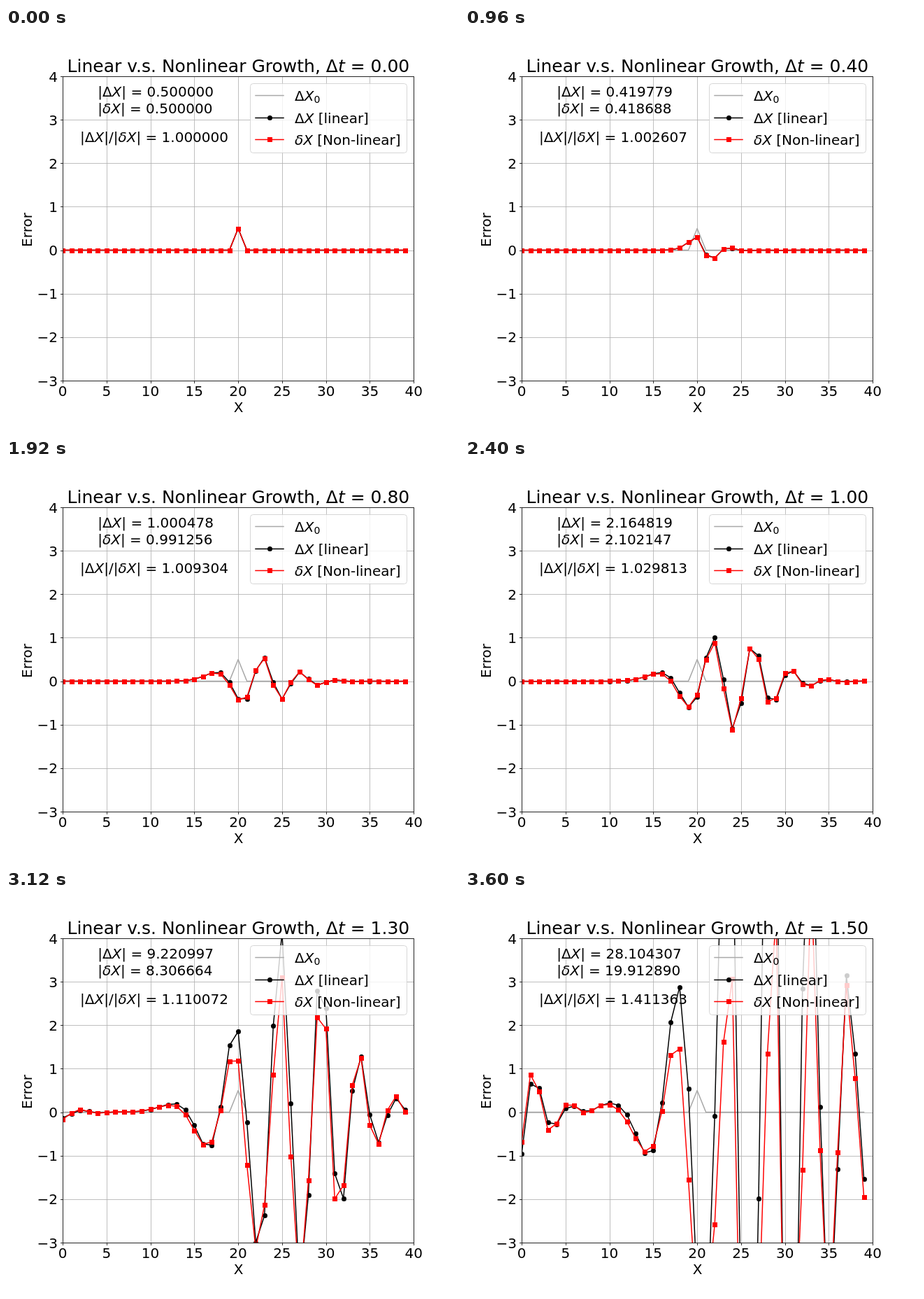
Recreate the animation shown at these times as an HTML page. Size 648 px wide and 576 px high, loop 3.72 s.

```html
<!DOCTYPE html>
<html lang="en">
<head>
<meta charset="utf-8">
<title>Linear v.s. Nonlinear Growth</title>
<style>
  html, body { margin: 0; width: 100%; height: 100%; overflow: hidden; background: #fff; }
  svg { display: block; width: 648px; height: 576px; }
  text { font: 20px "DejaVu Sans", sans-serif; white-space: pre; fill: #000; }
  .title { font-size: 25px; }
  .mid { text-anchor: middle; }
  .end { text-anchor: end; }
  .it { font-style: italic; }
  .sub { font-size: 14px; }
  .grid { stroke: #b0b0b0; stroke-opacity: .8; fill: none; }
  .axis { stroke: #000; stroke-opacity: .8; fill: none; }
  .line { stroke-width: 1.5; fill: none; stroke-linejoin: round; stroke-linecap: square; }
</style>
</head>
<body>
<svg id="stage" viewBox="0 0 648 576">
  <clipPath id="clip"><rect x="81" y="69" width="502.5" height="435.5"/></clipPath>
</svg>
<script>
const N = 40, F = 8, DT = 0.005, SUB = 10, FRAMES = 31, HOLD = 120, SITE = 20, KICK = 0.5;
const GREY = '#a9a9a9', BLACK = '#000', RED = '#f00';

// Lorenz-96: both runs start from rest, one with a kick at a single site.
const at = (v, i) => v[(i + N) % N];
const tendency = x => x.map((v, i) => at(x, i - 1) * (at(x, i + 1) - at(x, i - 2)) - v + F);
const add = (x, k, h) => x.map((v, i) => v + h * k[i]);
const base = t => F * (1 - Math.exp(-t));
const norm = v => Math.hypot(...v);

function rk4(x) {
  const a = tendency(x);
  const b = tendency(add(x, a, DT / 2));
  const c = tendency(add(x, b, DT / 2));
  const d = tendency(add(x, c, DT));
  return x.map((v, i) => v + DT / 6 * (a[i] + 2 * b[i] + 2 * c[i] + d[i]));
}

function euler(d, t) {
  const X = base(t);
  return d.map((v, i) => v + DT * (X * (at(d, i + 1) - at(d, i - 2)) - v));
}

function simulate() {
  const start = Array.from({ length: N }, (_, i) => i === SITE ? KICK : 0);
  const out = [];
  let lin = start, full = start;
  for (let f = 0; f < FRAMES; f++) {
    const t = f * SUB * DT;
    out.push({ t, start, lin, non: full.map(v => v - base(t)) });
    for (let s = 0; s < SUB; s++) {
      lin = euler(lin, t + s * DT);
      full = rk4(full);
    }
  }
  return out;
}

// Drawing helpers
const stage = document.getElementById('stage');
const px = i => 81 + i * 12.555;
const py = v => 504 - (v + 3) * 62.1257;
const snap = p => Math.floor(p + 0.5) + 0.5;

function el(tag, attrs, parent = stage) {
  const e = document.createElementNS('http://www.w3.org/2000/svg', tag);
  for (const k in attrs) e.setAttribute(k, attrs[k]);
  parent.appendChild(e);
  return e;
}

const it = s => `<tspan class="it">${s}</tspan>`;
function label(x, y, html, cls = '', extra = {}) {
  const e = el('text', { x, y, class: cls, ...extra });
  e.innerHTML = html;
  return e;
}

const dot = (x, y) => `M${x - 3} ${y + .5}a3.5 3.5 0 1 1 7 0a3.5 3.5 0 1 1 -7 0z`;
const square = (x, y) => `M${x - 3} ${y - 3}h7v7h-7z`;

function series(parent, color, mark) {
  const line = el('path', { class: 'line', stroke: color }, parent);
  const marks = el('path', { fill: color }, parent);
  return pts => {
    line.setAttribute('d', 'M' + pts.map(p => p.map(c => c.toFixed(2)).join(' ')).join('L'));
    if (mark) marks.setAttribute('d', pts.map(p => mark(...p.map(Math.round))).join(''));
  };
}

// Grid and tick labels
for (let i = 0; i <= 40; i += 5) {
  const x = snap(px(i));
  el('path', { class: 'grid', d: `M${x} 69.5V504.5` });
  el('path', { class: 'axis', d: `M${x} 504.5V508` });
  label(px(i), 526, i, 'mid');
}
for (let v = -3; v <= 4; v++) {
  const y = snap(py(v));
  el('path', { class: 'grid', d: `M81.5 ${y}H583.5` });
  el('path', { class: 'axis', d: `M78 ${y}H81.5` });
  label(74, py(v) + 7.5, v < 0 ? '\u2212' + -v : v, 'end');
}
label(332.5, 549, 'X', 'mid');
label(0, 0, 'Error', 'mid', { transform: 'translate(37 288.5) rotate(-90)' });

// Curves
const plot = el('g', { 'clip-path': 'url(#clip)' });
const drawStart = series(plot, GREY);
const drawLin = series(plot, BLACK, dot);
const drawNon = series(plot, RED, square);
el('rect', { class: 'axis', x: 81.5, y: 69.5, width: 502, height: 435 });

// Readouts
const title = label(332.4, 63, '', 'title mid');
const linText = label(131.2, 98, '');
const nonText = label(131.2, 122, '');
const ratioText = label(106.1, 163, '');

// Legend
el('rect', { x: 349.5, y: 79.5, width: 224, height: 99, rx: 4, fill: '#fff',
  'fill-opacity': .8, stroke: '#ccc', 'stroke-opacity': .8 });
function key(y, color, mark, html) {
  el('path', { class: 'line', stroke: color, d: `M357 ${y}H397` });
  if (mark) el('path', { fill: color, d: mark(377, Math.floor(y)) });
  label(413, y + 7, html);
}
const DX = '\u0394' + it('X'), dX = it('\u03b4X');
key(96.5, GREY, null, DX + '<tspan class="sub" dy="3">0</tspan>');
key(128.5, BLACK, dot, DX + ' [linear]');
key(159.5, RED, square, dX + ' [Non-linear]');

const points = v => v.map((y, i) => [px(i), py(y)]);
const frames = simulate();
let shown = -1;

function show(n) {
  const { t, start, lin, non } = frames[n];
  const a = norm(lin), b = norm(non);
  drawStart(points(start));
  drawLin(points(lin));
  drawNon(points(non));
  title.innerHTML = `Linear v.s. Nonlinear Growth, \u0394${it('t')} = ${t.toFixed(2)}`;
  linText.innerHTML = `|${DX}| = ${a.toFixed(6)}`;
  nonText.innerHTML = `|${dX}| = ${b.toFixed(6)}`;
  ratioText.innerHTML = `|${DX}|/|${dX}| = ${(a / b).toFixed(6)}`;
}

function tick() {
  const n = Math.floor(performance.now() / HOLD) % FRAMES;
  if (n !== shown) show(shown = n);
  requestAnimationFrame(tick);
}
tick();
</script>
</body>
</html>
```
